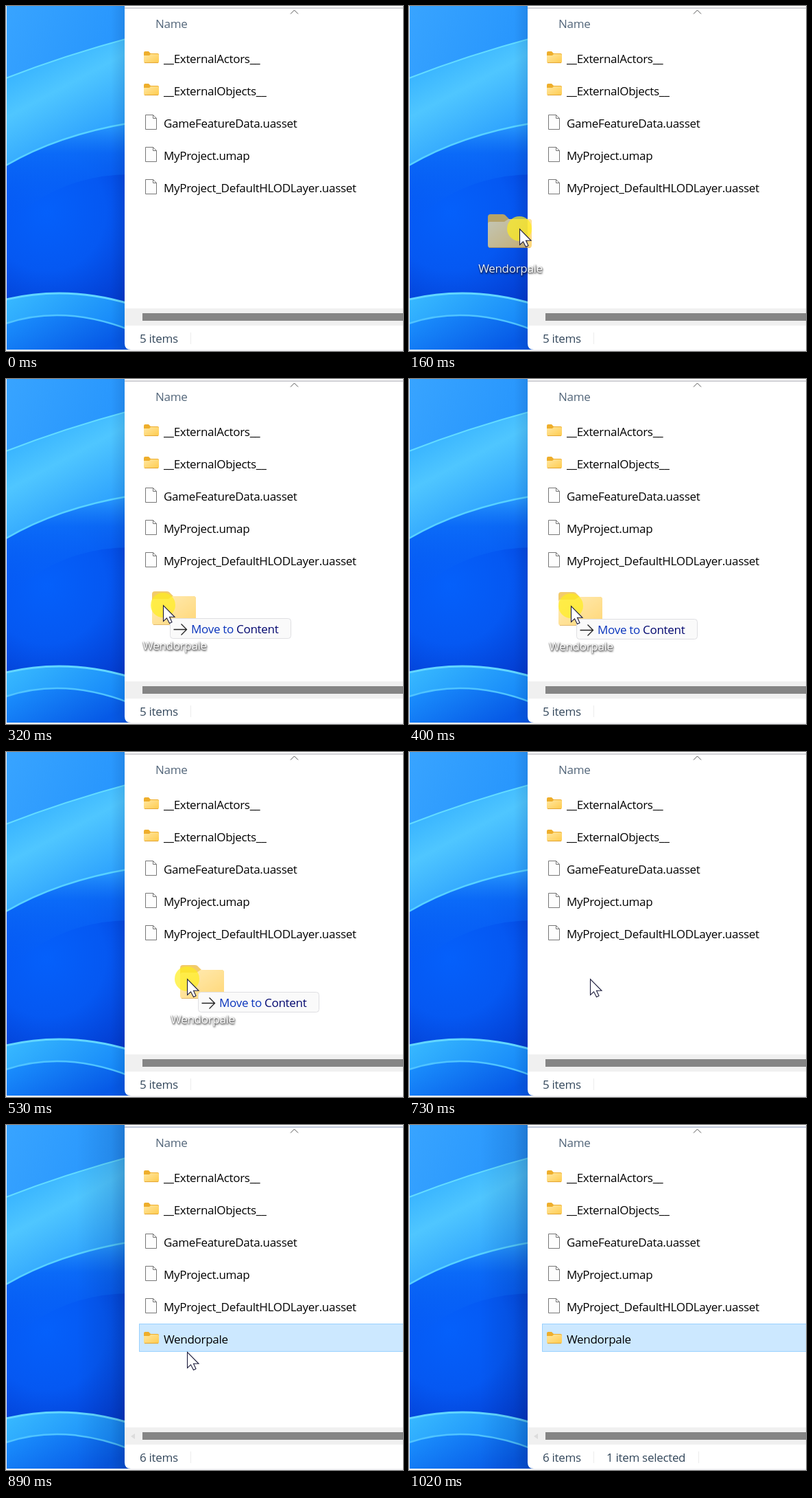
An HTML page for the animation above (1460 ms loop, 579 by 502 pixels).

```html
<!DOCTYPE html>
<html lang="en">
<head>
<meta charset="utf-8">
<title>Drag a folder into a project</title>
<style>
html, body { margin: 0; width: 100%; height: 100%; overflow: hidden; background: #f1f1f4; }
svg { display: block; }
text { font: 17px "Open Sans", "Noto Sans", sans-serif; letter-spacing: -.3px; white-space: pre; }
.label { fill: #fff; text-anchor: middle; filter: drop-shadow(0 1px 1px #000b) drop-shadow(1px 1px 1px #0008); }
.status { fill: #33475b; }
</style>
</head>
<body>
<svg width="579" height="502" viewBox="0 0 579 502">
  <defs>
    <linearGradient id="sky" x2=".7" y2="1">
      <stop stop-color="#38a4ff"/><stop offset="1" stop-color="#1687fb"/>
    </linearGradient>
    <linearGradient id="petal" x1=".1" y1=".2" x2=".5" y2="1">
      <stop stop-color="#36b2ff"/><stop offset=".35" stop-color="#4fc6ff"/><stop offset="1" stop-color="#2498fd"/>
    </linearGradient>
    <radialGradient id="deep" gradientUnits="userSpaceOnUse" cx="60" cy="300" r="190">
      <stop stop-color="#0560fb"/><stop offset=".45" stop-color="#0558f2"/><stop offset="1" stop-color="#0233c4"/>
    </radialGradient>
    <linearGradient id="rim" x2="0" y2="1">
      <stop stop-color="#2a9dff"/><stop offset=".3" stop-color="#0d72fb" stop-opacity=".7"/><stop offset="1" stop-color="#0558f2" stop-opacity="0"/>
    </linearGradient>
    <linearGradient id="fold" x2="1" y2=".6">
      <stop stop-color="#39bbff"/><stop offset="1" stop-color="#1282f8"/>
    </linearGradient>
    <linearGradient id="base" x2="1" y2=".5">
      <stop stop-color="#1c93ff"/><stop offset="1" stop-color="#0659e6"/>
    </linearGradient>
    <linearGradient id="shade">
      <stop stop-color="#001040" stop-opacity="0"/><stop offset="1" stop-color="#001040" stop-opacity=".3"/>
    </linearGradient>
    <linearGradient id="front" x2="1" y2="1">
      <stop stop-color="#ffe7a2"/><stop offset="1" stop-color="#ffcb4d"/>
    </linearGradient>
    <clipPath id="desk"><path d="M1 0H182V500H1z"/></clipPath>
    <g id="folder">
      <path d="M0 2Q0 0 2 0H7L10 3H20Q22 3 22 5V15H0z" fill="#eeae2c"/>
      <path d="M0 6H8L10 4H20Q22 4 22 6V15Q22 17 20 17H2Q0 17 0 15z" fill="url(#front)"/>
      <path d="M1 16.6H21" stroke="#e2a32f"/>
    </g>
    <g id="file" fill="#fdfdfd" stroke="#777">
      <path d="M.5 .5H11.5L16.5 5.5V21.5H.5z"/>
      <path d="M11.5 .5V5.5H16.5" fill="none"/>
    </g>
    <path id="arrow" d="M0 0H19M11-8L19 0L11 8" fill="none" stroke="#222" stroke-width="1.3"/>
  </defs>

  <g clip-path="url(#desk)">
    <rect width="182" height="500" fill="url(#sky)"/>
    <path d="M0 105Q85 72 182 46V240H0z" fill="url(#petal)"/>
    <path d="M0 105Q85 72 182 46" fill="none" stroke="#63dcff" stroke-width="2"/>
    <path d="M0 232Q75 188 182 170V440H0z" fill="url(#deep)"/>
    <path d="M0 232Q75 188 182 170V245Q75 245 0 320z" fill="url(#rim)"/>
    <path d="M0 232Q75 188 182 170" fill="none" stroke="#58d2ff" stroke-width="2.5"/>
    <path d="M0 427Q90 406 182 434V500H0z" fill="url(#fold)"/>
    <path d="M0 427Q90 406 182 434" fill="none" stroke="#62d6ff" stroke-width="3"/>
    <path d="M0 462Q85 434 182 472V500H0z" fill="url(#base)"/>
    <path d="M0 462Q85 434 182 472" fill="none" stroke="#4fc4ff" stroke-width="2.5"/>
    <rect x="153" width="29" height="500" fill="url(#shade)" opacity=".5"/>
    <rect id="shadow" x="103" width="79" height="500" fill="url(#shade)" opacity=".5"/>
  </g>

  <path d="M173 0H579V500H182Q173 500 173 491z" fill="#fff"/>
  <path id="topLine" d="M173 3H579" stroke="#d0d0d5" stroke-width="2"/>
  <path d="M415 11.5L420.5 6L426 11.5" fill="none" stroke="#555"/>
  <text x="218" y="32" fill="#53667a">Name</text>
  <rect id="focus" x="194.5" y="54.5" width="400" height="40" fill="none" stroke="#99d1ff"/>
  <rect id="row" x="194.5" y="289.5" width="400" height="40"/>
  <g id="list"></g>

  <path d="M173 440H579V465H173z" fill="#f0f0f0"/>
  <path id="scrollLeft" d="M188 449L182 453L188 457z" fill="#dcdcdc"/>
  <path d="M199 447H579V458H199z" fill="#858585"/>
  <text id="count" class="status" x="195" y="490"></text>
  <path d="M269.5 475V492" stroke="#ececec"/>
  <g id="picked">
    <text class="status" x="288" y="490">1 item selected</text>
    <path d="M422.5 475V492" stroke="#ececec"/>
  </g>

  <g id="ghost">
    <g opacity=".76">
      <path d="M0 4Q0 0 4 0H22Q25 0 27 3L31 7H60Q64 7 64 11V45H0z" fill="#eebb3c"/>
      <path d="M0 14Q0 11 3 11H24L30 7H60Q64 7 64 11V45Q64 49 60 49H4Q0 49 0 45z" fill="url(#front)"/>
      <path d="M2 48.5H62" stroke="#d9a441"/>
    </g>
    <text class="label" x="33" y="85" opacity=".9"></text>
  </g>
  <circle id="halo" r="18" fill="#ffee1c" opacity=".7"/>
  <g id="tip">
    <g id="tipBox">
      <rect x="26.5" y="39.5" width="176" height="29" rx="4" fill="#fafafa" stroke="#dfdfe2"/>
      <text x="57" y="61" fill="#00066e"><tspan fill="#0a35bd">Move to</tspan> Content</text>
    </g>
    <use href="#arrow" x="31.5" y="55.5"/>
  </g>
  <path id="cursor" d="M.5 .5V23.5L5.5 18.8L9.5 26.5L13 24.8L9.5 17.3H17z" fill="#fff" stroke="#1c1c3c" stroke-width="1.1"/>
</svg>
<script>
const LOOP = 1460;
const NEW_NAME = "Wendorpale";
const names = ["__ExternalActors__", "__ExternalObjects__", "GameFeatureData.uasset",
  "MyProject.umap", "MyProject_DefaultHLODLayer.uasset", NEW_NAME];
// start time, folder x and y, pointer x and y
const drag = [
  [80, 10, 282, 62, 305], [130, 62, 293, 115, 316], [160, 115, 303, 161, 324],
  [210, 165, 305, 190, 326], [240, 201, 307, 212, 327], [290, 209, 308, 224, 328],
  [320, 213, 309, 229, 329], [370, 216, 310, 233, 330], [400, 218, 310, 236, 330],
  [450, 228, 310, 243, 330], [480, 242, 310, 253, 330], [530, 254, 310, 264, 330]
];
const $ = id => document.getElementById(id);
const show = (id, on) => $(id).style.display = on ? "" : "none";
const move = (id, x, y) => $(id).setAttribute("transform", `translate(${x} ${y})`);
const paint = (id, attrs) => {
  for (const key in attrs) $(id).setAttribute(key, attrs[key]);
};

$("list").innerHTML = names.map((name, i) => {
  const y = 47 * i;
  const icon = name.includes(".")
    ? `<use href="#file" x="203" y="${64 + y}"/>`
    : `<use href="#folder" x="201" y="${66 + y}"/>`;
  return `<g>${icon}<text x="230" y="${83 + y}">${name}</text></g>`;
}).join("");
$("list").lastChild.id = "added";
document.querySelector(".label").textContent = NEW_NAME;

function draw(t) {
  const dragging = t >= 80 && t < 730;
  const added = t >= 780;
  const selected = t >= 890;
  const [, fx, fy, px, py] = drag.findLast(step => step[0] <= t) || drag[0];

  move("ghost", fx, fy);
  move("tip", fx, fy);
  move("halo", px, py);
  move("cursor", px, py);
  show("ghost", dragging);
  show("halo", dragging);
  show("tip", dragging && t >= 210);
  show("tipBox", t >= 320);
  show("cursor", t >= 80 && t < 1020);

  show("added", added);
  show("row", added);
  paint("row", selected ? { fill: "#cce8ff", stroke: "#99d1ff" } : { fill: "#e5f3ff", stroke: "#e5f3ff" });
  show("focus", added && !selected);
  show("picked", t >= 940);
  show("scrollLeft", selected);
  show("shadow", added);
  paint("topLine", { stroke: selected ? "#bcc5d6" : "#d0d0d5" });
  $("count").textContent = (added ? 6 : 5) + " items";
}

function tick() {
  draw(performance.now() % LOOP);
  requestAnimationFrame(tick);
}
tick();
</script>
</body>
</html>
```
